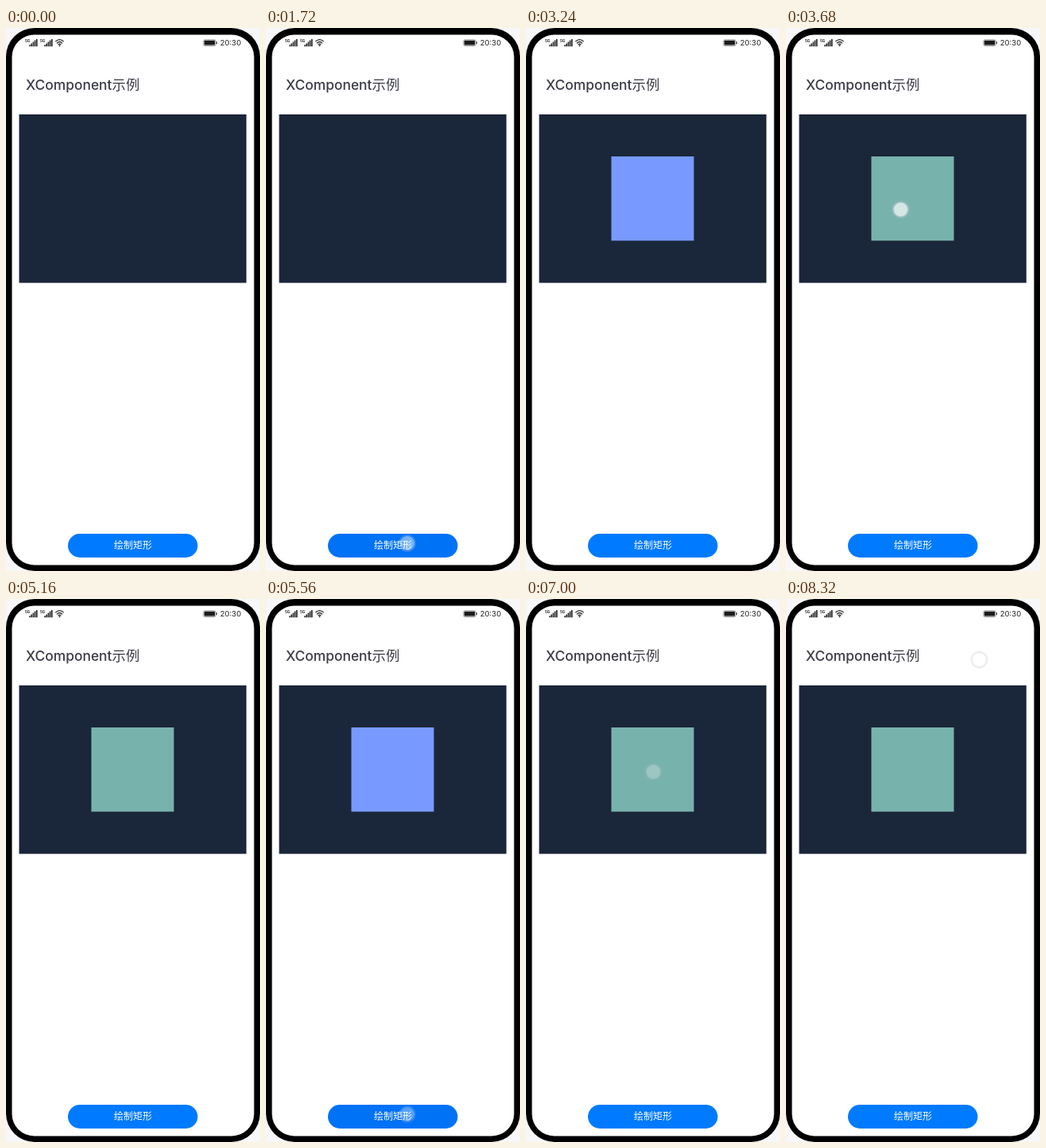
An HTML page that plays this animation: 320 px wide and 685 px high, repeating every 8.4 s.

```html
<!DOCTYPE html>
<html lang="zh">
<head>
<meta charset="utf-8">
<title>XComponent示例</title>
<style>
html, body { margin: 0; width: 100%; height: 100%; overflow: hidden; background: #f7f7fa; }
svg { display: block; width: 320px; height: 685px; }
text { font-family: Inter, "Noto Sans CJK SC", "Noto Sans CJK", sans-serif; }
.title { font-size: 17.4px; font-weight: 500; fill: #3a3b46; }
.label { font-size: 12px; font-weight: 500; fill: #fff; text-anchor: middle; }
.clock { font-size: 9.5px; fill: #222; }
.net { font-size: 4.6px; font-weight: 700; fill: #222; }

.square, .button, .touch { animation: 8.4s step-end infinite; }
.square { animation-name: square; }
.button { animation-name: press; }
.touch { animation-name: touch; }

@keyframes square {
  0% { fill: #7899ff; opacity: 0; }
  21.904% { fill: #7899ff; opacity: 1; }
  43.809% { fill: #77b3ac; opacity: 1; }
  66.19% { fill: #7899ff; opacity: 1; }
  81.904%, 100% { fill: #77b3ac; opacity: 1; }
}
@keyframes press {
  0%, 23.333%, 67.619%, 100% { fill: #007aff; }
  20.476%, 64.285% { fill: #0072f6; }
}
@keyframes touch {
  0% { transform: translate(178px, 650px); opacity: 0; }
  20.476% { transform: translate(178px, 650px); opacity: .7; }
  21.428% { transform: translate(178px, 650px); opacity: .65; }
  21.904% { transform: translate(178px, 650px); opacity: .5; }
  22.857% { transform: translate(178px, 650px); opacity: .3; }
  23.333% { transform: translate(178px, 650px); opacity: .15; }
  24.285% { transform: translate(144.5px, 229px); opacity: 0; }
  43.809% { transform: translate(144.5px, 229px); opacity: 1; }
  44.761% { transform: translate(144.5px, 229px); opacity: .75; }
  45.714% { transform: translate(144.5px, 229px); opacity: .45; }
  46.19% { transform: translate(144.5px, 229px); opacity: .2; }
  47.142% { transform: translate(178px, 650px); opacity: 0; }
  64.285% { transform: translate(178px, 650px); opacity: .7; }
  65.238% { transform: translate(178px, 650px); opacity: .65; }
  66.19% { transform: translate(178px, 650px); opacity: .5; }
  66.666% { transform: translate(178px, 650px); opacity: .35; }
  67.619% { transform: translate(178px, 650px); opacity: .15; }
  68.571% { transform: translate(160.5px, 218px); opacity: 0; }
  80.952% { transform: translate(160.5px, 218px); opacity: 1; }
  81.904% { transform: translate(160.5px, 218px); opacity: .9; }
  82.857% { transform: translate(160.5px, 218px); opacity: .65; }
  83.333% { transform: translate(160.5px, 218px); opacity: .4; }
  84.285% { transform: translate(160.5px, 218px); opacity: .15; }
  84.761% { transform: translate(243.5px, 76.5px); opacity: 0; }
  99.047%, 100% { transform: translate(243.5px, 76.5px); opacity: 1; }
}
</style>
</head>
<body>
<svg viewBox="0 0 320 685">
  <defs>
    <g id="signal">
      <text class="net" x="0" y="4.2">5G</text>
      <path d="M6 9.2V7.2M8.2 9.2V5.4M10.4 9.2V3.4M12.6 9.2V1.6M14.8 9.2V0" stroke="#222" stroke-width="1.6"/>
    </g>
  </defs>

  <rect width="320" height="685" rx="36"/>
  <rect x="7.5" y="8.5" width="305" height="669" rx="28" fill="#fff"/>

  <use href="#signal" x="24" y="14"/>
  <use href="#signal" x="43" y="14"/>
  <g fill="none" stroke="#222" stroke-width="1.2">
    <path d="M62.3 17.2Q67.5 12 72.7 17.2M64 19.2Q67.5 15.8 71 19.2M65.6 21Q67.5 19.2 69.4 21"/>
    <circle cx="67.5" cy="22.3" r=".4"/>
  </g>
  <rect x="248.9" y="14.9" width="15.2" height="7.6" rx="1.7" fill="none" stroke="#777" stroke-width=".8"/>
  <rect x="249.8" y="15.8" width="13.4" height="5.8" rx=".8" fill="#1c1c1c"/>
  <rect x="264.8" y="17.1" width="1.2" height="3.2" rx=".5" fill="#444"/>
  <text class="clock" x="269.8" y="22">20:30</text>

  <text class="title" x="25" y="77.7">XComponent示例</text>

  <rect x="16.5" y="109" width="286.3" height="212.5" fill="#1a2639"/>
  <rect class="square" x="107.5" y="162" width="104" height="106.3"/>

  <rect class="button" x="78" y="638" width="163.5" height="30" rx="15"/>
  <text class="label" x="160" y="657.2">绘制矩形</text>

  <g class="touch">
    <circle r="9" fill="#fff" fill-opacity=".68"/>
    <circle r="9.7" fill="none" stroke="#c8c8dc" stroke-opacity=".38" stroke-width="2.2"/>
  </g>
</svg>
</body>
</html>
```
